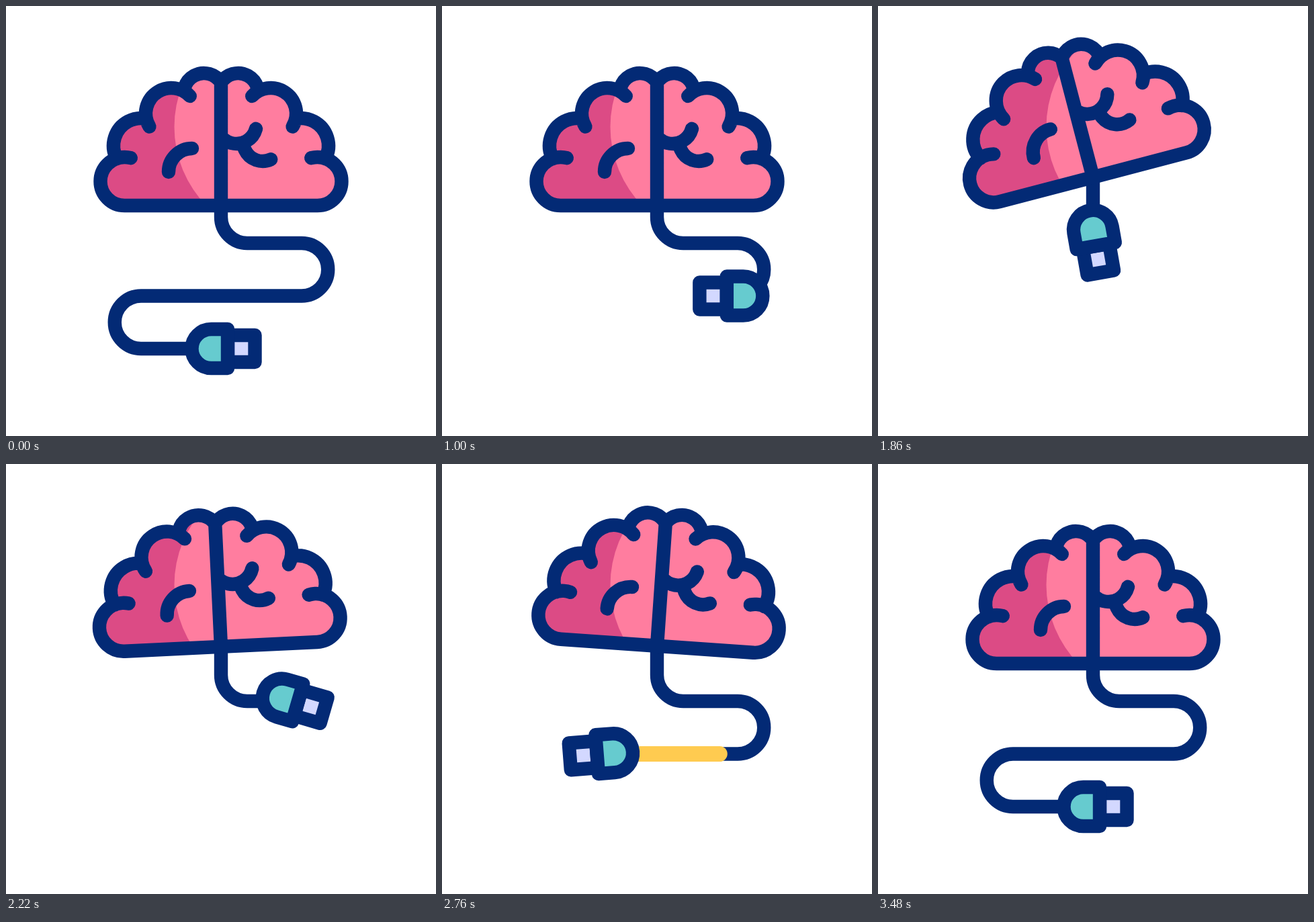
An HTML page with a canvas that plays this animation: 640x640 px, repeating every 3600 ms.

```html
<!DOCTYPE html>
<html lang="en">
<head>
<meta charset="utf-8">
<title>Plugged brain</title>
<style>
  html, body { margin: 0; width: 100%; height: 100%; overflow: hidden; background: #fff; }
  canvas { display: block; width: 640px; height: 640px; }
</style>
</head>
<body>
<canvas id="stage" width="640" height="640"></canvas>
<script>
const ctx = document.getElementById('stage').getContext('2d');
const LOOP = 3600, LINE = 20.4, RAD = Math.PI / 180;
const NAVY = '#032a75', PINK = '#ff7d9f', ROSE = '#dc4b85';
const TEAL = '#66cbcf', PALE = '#d3d8ff', YELLOW = '#ffcb50';

// Smooth step from 0 to 1 while v runs between two limits.
function ease(from, to, v) {
  const u = Math.min(1, Math.max(0, (v - from) / (to - from)));
  return (1 - Math.cos(Math.PI * u)) / 2;
}

// Rises to 1 at the peak, then returns to 0.
const swing = (rise, peak, fall, t) => ease(rise, peak, t) - ease(peak, fall, t);

// The brain hops high, lands a little low, hops again and settles.
function brainLift(t) {
  const squat = 7.7;
  return -51.5 * swing(1580, 1970, 2510, t)
    - 34 * swing(2510, 2755, 3000, t)
    + squat * swing(1970, 2510, 2511, t)
    + squat * (t > 2511 ? 1 - ease(3000, 3230, t) : ease(2510, 2511, t));
}

function brainTilt(t) {
  return -14.7 * swing(1540, 1870, 2360, t)
    - 2.3 * swing(2200, 2520, 2760, t)
    + 4 * swing(2520, 2760, 3000, t);
}

// Distances along the cable count from the brain's base at y = 297.
const FAR = 765, NEAR = 38;
const plugTravel = t => FAR - (FAR - NEAR) * (ease(0, 1670, t) - ease(1800, 3480, t));

// The plug turns around each bend a little wider than the cable does.
const plugHeading = s => 90 - 90 * ease(28, 85, s) + 180 * ease(110, 290, s) - 180 * ease(455, 733, s);

const BENDS = 'H440 A39.25 39.25 0 0 1 440 431.5 H201 A39.25 39.25 0 0 0 201 510 H340';
const CABLE_LEAD = 57;
const cable = new Path2D('M320 240 V314 A39 39 0 0 0 359 353 ' + BENDS);
const plugPath = document.createElementNS('http://www.w3.org/2000/svg', 'path');
plugPath.setAttribute('d', 'M320 309 V341 A12 12 0 0 0 332 353 ' + BENDS);

function addArc(path, x, y, r, from, to) {
  path.moveTo(x + r * Math.cos(from * RAD), y + r * Math.sin(from * RAD));
  path.arc(x, y, r, from * RAD, to * RAD, to < from);
}

function mirrored(path) {
  const both = new Path2D(path);
  both.addPath(path, new DOMMatrix([-1, 0, 0, 1, 640, 0]));
  return both;
}

const halfFill = new Path2D('M320 297');
const halfLine = new Path2D('M320 114 V297 H176.5');
function lobe(x, y, r, from, to) {
  halfFill.arc(x, y, r, from * RAD, to * RAD);
  addArc(halfLine, x, y, r, from, to);
}
lobe(176.5, 261, 36, 90, 285);
lobe(201, 208, 41, 152, 278);
lobe(246, 160, 38, 149, 317);
lobe(294.5, 130, 30, 196, 328);
const brainFill = mirrored(halfFill), brainLine = mirrored(halfLine);
addArc(brainLine, 277, 247, 35, 180, 270);
addArc(brainLine, 343, 175, 30, 15, 130);
addArc(brainLine, 382, 202, 29, 65, 168);

const plugBody = new Path2D('M24.5 -29 H0 A29 29 0 0 0 0 29 H24.5 Z');
const plugHead = new Path2D('M24.5 -20 H65 V20 H24.5 Z');

function ink(path, fill) {
  if (fill) {
    ctx.fillStyle = fill;
    ctx.fill(path);
  }
  ctx.strokeStyle = NAVY;
  ctx.lineWidth = LINE;
  ctx.stroke(path);
}

function drawCable(from, to, color, width) {
  if (to <= from) return;
  ctx.save();
  ctx.strokeStyle = color;
  ctx.lineWidth = width;
  ctx.setLineDash([to - from, 9999]);
  ctx.lineDashOffset = -(from + CABLE_LEAD);
  ctx.stroke(cable);
  ctx.restore();
}

function drawPlug(travel) {
  const { x, y } = plugPath.getPointAtLength(travel);
  ctx.save();
  ctx.translate(x, y);
  ctx.rotate(plugHeading(travel) * RAD);
  ctx.translate(-16, 0);
  ink(plugHead, PALE);
  ink(plugBody, TEAL);
  ctx.restore();
}

function drawBrain(lift, tilt) {
  const pose = new DOMMatrix().translate(320, 297 + lift).rotate(tilt).translate(-320, -297);
  ctx.save();
  ctx.setTransform(pose);
  ctx.fillStyle = ROSE;
  ctx.fill(brainFill);
  ctx.clip(brainFill);
  // The light area stays put while the brain moves over it.
  ctx.resetTransform();
  ctx.fillStyle = PINK;
  ctx.beginPath();
  ctx.arc(418.5, 180, 168, 0, 2 * Math.PI);
  ctx.fill();
  ctx.restore();

  ctx.save();
  ctx.setTransform(pose);
  ink(brainLine);
  ctx.restore();
}

function draw(t) {
  const lift = brainLift(t), travel = plugTravel(t);
  ctx.fillStyle = '#fff';
  ctx.fillRect(0, 0, 640, 640);
  ctx.lineCap = ctx.lineJoin = 'round';

  drawCable(Math.min(lift, 0), travel - 16, NAVY, LINE);
  const pulse = t - 2452;
  drawCable(Math.max(0, pulse), Math.min(659, pulse + 118), YELLOW, 23);
  drawPlug(travel);
  drawBrain(lift, brainTilt(t));
}

const start = performance.now();
function tick() {
  draw((performance.now() - start) % LOOP);
  requestAnimationFrame(tick);
}
tick();
</script>
</body>
</html>
```
